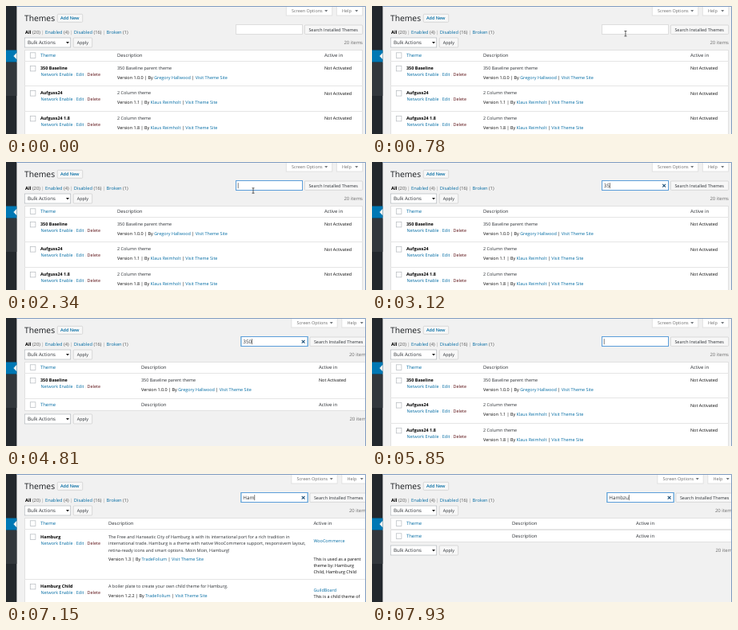
Recreate the animation shown at these times as an HTML page. Size 450 px wide and 161 px high, loop 8000 ms.

```html
<!DOCTYPE html>
<html lang="en">
<head>
<meta charset="utf-8">
<title>Theme search</title>
<style>
html, body { margin: 0; width: 100%; height: 100%; overflow: hidden; background: #f1f1f1; }
svg { display: block; width: 450px; height: 161px; }
text { font: 5.45px "Open Sans", sans-serif; fill: #2a2e33; text-rendering: geometricPrecision; }
.h1 { font-size: 10.3px; fill: #15181c; }
.head { font-size: 5.9px; }
.menu { font-size: 5.72px; fill: #555; }
.select { font-size: 6.1px; }
.query { font-size: 6.3px; }
.b { font-weight: 700; fill: #000; }
.semi { font-weight: 600; }
.ink { fill: #0a0a0a; }
.a { fill: #006ba3; }
.dim { fill: #6c6c6c; }
.sep { fill: #999; }
.dot { fill: #bbb; font-size: 2.4px; }
.del { fill: #580c10; }
.box { fill: #fff; stroke: #b4b9be; stroke-width: .7; }
.btn { fill: #f7f7f7; stroke: #ccc; stroke-width: .7; }
.card { fill: #fff; stroke: #e1e1e1; }
.line { stroke: #e5e5e5; }
#field { fill: #fff; stroke: #ddd; }
#field.focus { stroke: #5b9dd9; filter: drop-shadow(0 0 .4px rgba(30, 140, 190, .8)); }
</style>
</head>
<body>
<svg id="stage" viewBox="0 0 450 161"></svg>
<script>
const LOOP = 8000, SHIFT = 6.5, QUERY_X = 289.8;
const WIDE = 445.5, CUT = 452;
const stage = document.getElementById('stage');

const span = (cls, s) => `<tspan class="${cls}">${s}</tspan>`;
const link = s => span('a', s);
const bar = ' ' + span('sep', '|') + ' ';
const dot = ' ' + span('dot', '|') + ' ';
const text = (x, y, s, cls = '') => `<text x="${x}" y="${y}" class="${cls}">${s}</text>`;
const rect = (x, y, w, h, cls, r = 0) =>
  `<rect x="${x}" y="${y}" width="${w}" height="${h}" rx="${r}" class="${cls}"/>`;
const fill = (x, y, w, h, c) => `<rect x="${x}" y="${y}" width="${w}" height="${h}" fill="${c}"/>`;
const rule = (y, right) => `<path class="line" d="M23 ${y}H${right}"/>`;
const check = y => rect(30.3, y - 3.2, 6.6, 6.6, 'box');
const arrow = (x, y, c = '#72777c') => `<path d="M${x - 2} ${y - 1}h4l-2 2.4z" fill="${c}"/>`;

const bulk = y =>
  rect(23.3, y - 6, 57.4, 12, 'box') + text(27, y + 2.2, 'Bulk Actions', 'select') +
  arrow(77, y, '#222') +
  rect(84.3, y - 6, 23.4, 12, 'btn', 1) + text(88.8, y + 2, 'Apply');
const count = (x, y) => text(x, y + 2.2, '20 items', 'head dim');

const heads = (y, desc, active) =>
  check(y) + text(43, y + 2, link('Theme'), 'head') +
  text(desc, y + 2, 'Description', 'head') + text(active, y + 2, 'Active in', 'head');

const version = (v, by) => `Version ${v} | By ${link(by)} | ${link('Visit Theme Site')}`;

// One theme: name and actions, description lines, then version line
function row(y, name, desc, lines, ver, by, last = 12) {
  return check(y + .5) + text(43, y + 2, name, 'b') +
    text(43.4, y + 10.2, link('Network Enable') + dot + link('Edit') + dot + span('del', 'Delete')) +
    lines.map((s, i) => text(desc, y + 2 + i * 8.6, s)).join('') +
    text(desc, y + 2 + last, version(ver, by), 'ink');
}

const table = (bottom, right) =>
  rect(23.5, 55.5, right - 23.5, bottom - 55.5, 'card') + rule(69.5, right);
const footer = (y, desc, active) =>
  rule(y - 7.5, CUT) + heads(y, desc, active) + bulk(y + 18) + count(429.5, y + 18);
const tab = (x, w, s) =>
  rect(x, -2, w, 14, 'card') + text(x + 6.7, 8, s, 'dim') + arrow(x + w - 7.5, 6);

const dev1 = 'Gregory Hallwood', dev2 = 'Klaus Reimholt', shop = 'TradeFolium';
const views = {
  all: table(170, WIDE) + heads(62, 139, 398) +
    row(78, '350 Baseline', 139, ['350 Baseline parent theme'], '1.0.0', dev1) + rule(100.5, WIDE) +
    row(109.2, 'Aufguss24', 139, ['2 Column theme'], '1.1', dev2) + rule(132.5, WIDE) +
    row(141, 'Aufguss24 1.8', 139, ['2 Column theme'], '1.8', dev2) +
    [80, 111.5, 143].map(y => text(398, y, 'Not Activated', 'ink')).join(''),
  one: table(116.5, CUT) + heads(62, 169, 391) +
    row(78, '350 Baseline', 169, ['350 Baseline parent theme'], '1.0.0', dev1) +
    text(391, 80, 'Not Activated', 'ink') + footer(109, 169, 391),
  ham: table(170, CUT) + heads(62, 128, 384.4) +
    row(78.5, 'Hamburg', 128, [
      'The Free and Hanseatic City of Hamburg is with its international port for a rich tradition in',
      'international trade. Hamburg is a theme with native WooCommerce support, responsivem layout,',
      'retina-ready icons and smart options. Moin Moin, Hamburg!'], '1.3', shop, 28.5) +
    text(384.4, 86, link('WooCommerce')) +
    ['This is used as a parent', 'theme by: Hamburg', 'Child, Hamburg Child']
      .map((s, i) => text(384.4, 108.5 + i * 8.4, s, 'ink')).join('') +
    rule(132.5, CUT) +
    row(141, 'Hamburg Child', 128, ['A boiler plate to create your own child theme for Hamburg.'], '1.2.2', shop) +
    text(384.4, 148.2, link('GuildBoard')) + text(384.4, 156.4, 'This is a child theme of', 'ink'),
  none: table(85.5, CUT) + heads(62, 175, 330) + footer(78, 175, 330)
};

const menu = [['Enabled', 4], ['Disabled', 16], ['Broken', 1]]
  .map(([s, n]) => bar + link(s) + ` (${n})`).join('');

stage.innerHTML =
  fill(0, 0, 450, 161, '#f1f1f1') +
  fill(0, 0, 13.4, 161, '#23282d') + fill(0, 71, 13.4, 42, '#32373c') + fill(0, 55.5, 13.4, 15, '#0078b4') +
  '<path d="M13.4 58.8v8.4l-4-4.2z" fill="#f1f1f1"/>' +
  text(23, 19, 'Themes', 'h1') +
  rect(64.3, 10.3, 31.4, 10, 'btn', 1) + text(68, 17.4, link('Add New'), 'semi') +
  text(24, 35, span('b', 'All') + ' (20)' + menu, 'menu') + bulk(46) +
  Object.keys(views).map(k => `<g id="${k}">${views[k]}</g>`).join('') +
  '<g id="right">' +
    tab(350.3, 57.4, 'Screen Options') + tab(413.3, 32.4, 'Help') +
    rect(373.3, 24, 72.4, 11.4, 'btn', 1) + text(378.4, 31.8, 'Search Installed Themes') +
    '<rect id="field" x="287.5" y="23.5" width="83" height="12"/>' +
    `<text id="query" class="query" x="${QUERY_X}" y="32"></text>` +
    '<path id="clear" d="M363.2 27.8l3.8 3.8m0-3.8l-3.8 3.8" stroke="#1a4f78" stroke-width="1.1"/>' +
    '<path id="caret" d="M0 26.2v7" stroke="#444" stroke-width=".7"/>' +
    count(422.5, 46) +
  '</g>' +
  '<path id="beam" d="M-1.5-3.2H1.5M0-3.2V3.2M-1.5 3.2H1.5" stroke="#222" stroke-width=".7"/>' +
  '<path d="M13.4 .5H449.5V161" fill="none" stroke="#7f9bc0"/>';

// Time, typed text, visible list, caret, focus
const steps = [
  [0, '', 'all', 0, 0],
  [1040, '', 'all', 1, 1],
  [1560, '', 'all', 0, 1],
  [2210, '', 'all', 1, 1],
  [2730, '3', 'all', 1, 1],
  [2990, '35', 'all', 1, 1],
  [3250, '350', 'one', 1, 1],
  [4160, '350', 'one', 0, 1],
  [4680, '350', 'one', 1, 1],
  [4940, '35', 'one', 1, 1],
  [5200, '3', 'one', 1, 1],
  [5590, '', 'all', 1, 1],
  [6240, '', 'all', 0, 1],
  [6760, 'H', 'all', 1, 1],
  [6890, 'Ha', 'all', 1, 1],
  [7020, 'Ham', 'ham', 1, 1],
  [7280, 'Hamb', 'ham', 1, 1],
  [7410, 'Hambz', 'none', 1, 1],
  [7800, 'Hambzu', 'none', 1, 1]
];

const $ = id => document.getElementById(id);
const show = (id, on) => $(id).setAttribute('visibility', on ? 'visible' : 'hidden');
const ease = p => p * p * (3 - 2 * p);
let current;

function apply([, typed, view, caret, focus]) {
  for (const k in views) show(k, k === view);
  $('right').setAttribute('transform', `translate(${view === 'all' ? 0 : SHIFT})`);
  $('query').textContent = typed;
  const end = typed ? $('query').getComputedTextLength() + .4 : .4;
  $('caret').setAttribute('transform', `translate(${QUERY_X + end})`);
  show('caret', caret);
  show('clear', typed);
  $('field').classList.toggle('focus', !!focus);
}

function draw() {
  const t = performance.now() % LOOP;
  const step = steps.filter(s => s[0] <= t).pop();
  if (step !== current) apply(current = step);
  const p = ease(Math.min(1, Math.max(0, (t - 520) / 390)));
  $('beam').setAttribute('transform', `translate(${340 - 31 * p} ${31 + 5 * p})`);
  show('beam', t >= 520 && t < 2730);
  requestAnimationFrame(draw);
}
draw();
</script>
</body>
</html>
```
